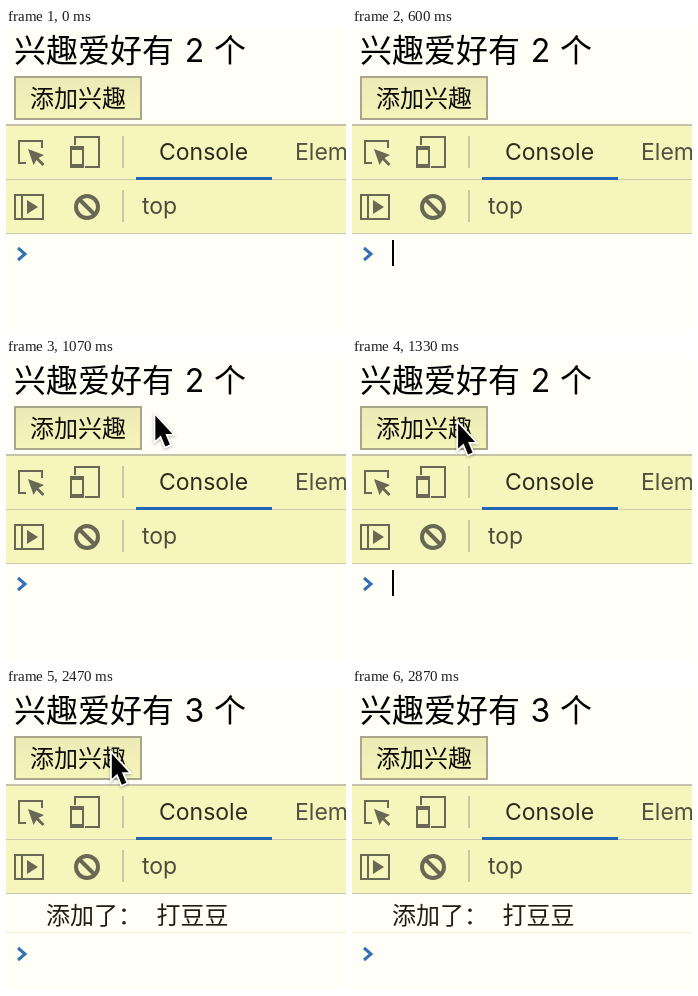
An HTML page with a canvas for the animation above (3.19 s loop, 340 by 302 pixels).

```html
<!DOCTYPE html>
<html lang="zh">
<head>
<meta charset="utf-8">
<style>
  html, body { margin: 0; width: 100%; height: 100%; overflow: hidden; background: #fffff8; }
  canvas { display: block; width: 340px; height: 302px; }
</style>
</head>
<body>
<canvas id="stage" width="340" height="302"></canvas>
<script>
const ctx = document.getElementById('stage').getContext('2d');
const LOOP = 3190;
const TICK = 200 / 3;
const CJK = '"Noto Sans CJK SC", "Noto Sans CJK", sans-serif';
const UI = 'Inter, Roboto, sans-serif';
const ICON = '#686855';
const PAGE = '#fffff8';
const BAR = '#f5f5bc';

function rect(x, y, w, h, color) {
  ctx.fillStyle = color;
  ctx.fillRect(x, y, w, h);
}

function text(str, x, y, size, family, color, align = 'left') {
  ctx.font = `${size}px ${family}`;
  ctx.textAlign = align;
  ctx.fillStyle = color;
  ctx.fillText(str, x, y);
}

function trace(points, closed) {
  ctx.beginPath();
  points.forEach(([x, y]) => ctx.lineTo(x, y));
  if (closed) ctx.closePath();
}

function line(points, color = ICON, width = 2) {
  trace(points, false);
  ctx.strokeStyle = color;
  ctx.lineWidth = width;
  ctx.stroke();
}

function shape(points, color = ICON) {
  trace(points, true);
  ctx.fillStyle = color;
  ctx.fill();
}

function frameBox(x, y, w, h) {
  ctx.strokeStyle = ICON;
  ctx.lineWidth = 2;
  ctx.strokeRect(x, y, w, h);
}

function drawPage(count, pressed) {
  text('兴趣爱好有', 8, 33.5, 32, CJK, '#000');
  text(count, 188.5, 34, 32, UI, '#000', 'center');
  text('个', 208, 33.5, 32, CJK, '#000');

  rect(8, 48, 128, 44, '#a8a78c');
  const fill = ctx.createLinearGradient(0, 50, 0, 90);
  fill.addColorStop(0, pressed ? '#d6d59c' : '#ecebb6');
  fill.addColorStop(1, pressed ? '#e2e1a8' : '#f5f4ba');
  rect(10, 50, 124, 40, fill);
  text('添加兴趣', 24, 78.5, 24, CJK, '#0c0c04');
}

function drawInspectIcon() {
  line([[20, 135], [13, 135], [13, 113], [36, 113], [36, 120]]);
  shape([[22, 121], [38, 127], [32.5, 130], [38.5, 136], [36.5, 138], [30.5, 132], [27.5, 137]]);
}

function drawDeviceIcon() {
  line([[69, 117], [69, 109], [93, 109], [93, 139], [79, 139]]);
  rect(64, 118, 14, 22, ICON);
  rect(66, 122, 10, 14, BAR);
}

function drawSidebarIcon() {
  frameBox(9, 167, 28, 24);
  line([[16, 167], [16, 191]]);
  shape([[21, 172], [32, 179], [21, 186]]);
}

function drawClearIcon() {
  ctx.beginPath();
  ctx.arc(81, 179, 11, 0, Math.PI * 2);
  ctx.strokeStyle = ICON;
  ctx.lineWidth = 4;
  ctx.stroke();
  line([[73.5, 171.5], [88.5, 186.5]], ICON, 4);
}

function drawToolbars() {
  rect(0, 96, 340, 110, BAR);
  rect(0, 96, 340, 2, '#c5c4a8');
  for (const y of [151, 205]) rect(0, y, 340, 1, '#cbcaae');
  for (const y of [108, 162]) rect(116, y, 2, 32, '#c8c7a6');
  rect(130, 149, 136, 3, '#2068b4');
  drawInspectIcon();
  drawDeviceIcon();
  drawSidebarIcon();
  drawClearIcon();
  text('Console', 153, 132, 23, UI, '#2c2c20');
  text('Elements', 289, 132, 23, UI, '#525242');
  text('top', 136, 186, 23, UI, '#4c4c3c');
}

function drawConsole(logged, caret) {
  const y = logged ? 266 : 226;
  if (logged) {
    text('添加了：', 40, 236, 24, CJK, '#202012');
    text('打豆豆', 150.5, 236, 24, CJK, '#202012');
    rect(0, 244, 340, 1, '#f1f1d0');
  }
  line([[12, y - 6], [19, y], [12, y + 6]], '#3470b8', 3);
  if (caret) rect(40, 212, 2, 26, '#000');
}

function progress(t, from, to) {
  return Math.min(1, Math.max(0, (t - from) / (to - from)));
}

// Glides in from the right, rests on the button, then speeds off to the right.
function pointerAt(t) {
  const remaining = 1 - progress(t, 600, 1400);
  const settle = progress(t, 1070, 1330);
  const leave = progress(t, 2430, 2870) ** 2;
  return [
    103.5 + 236 * remaining ** 1.85 + 280 * leave,
    57.5 + 8 * settle * settle * (3 - 2 * settle) + 21 * leave
  ];
}

function drawPointer([x, y]) {
  ctx.save();
  ctx.translate(x, y);
  trace([[0, 0], [0, 25], [5.5, 20], [10, 31], [14.5, 29], [10, 18.5], [17, 18.5]], true);
  ctx.shadowColor = 'rgba(0, 0, 0, .3)';
  ctx.shadowBlur = 3;
  ctx.shadowOffsetY = 1;
  ctx.strokeStyle = '#fff';
  ctx.lineWidth = 3.5;
  ctx.stroke();
  ctx.shadowColor = 'transparent';
  ctx.fillStyle = '#000';
  ctx.fill();
  ctx.restore();
}

function draw(time) {
  const tick = Math.floor((time % LOOP + 4) / TICK);
  const t = Math.round(tick * TICK / 10) * 10;
  const logged = t >= 1730;
  const pressed = t >= 1670 && !logged;
  const caret = t < 1670 && (t + 670) % 1000 < 500;

  rect(0, 0, 340, 302, PAGE);
  drawPage(logged ? '3' : '2', pressed);
  drawToolbars();
  drawConsole(logged, caret);
  if (t > 600 && t < 2870) drawPointer(pointerAt(t));
}

const start = performance.now();
function frame() {
  draw(performance.now() - start);
  requestAnimationFrame(frame);
}
frame();
</script>
</body>
</html>
```
